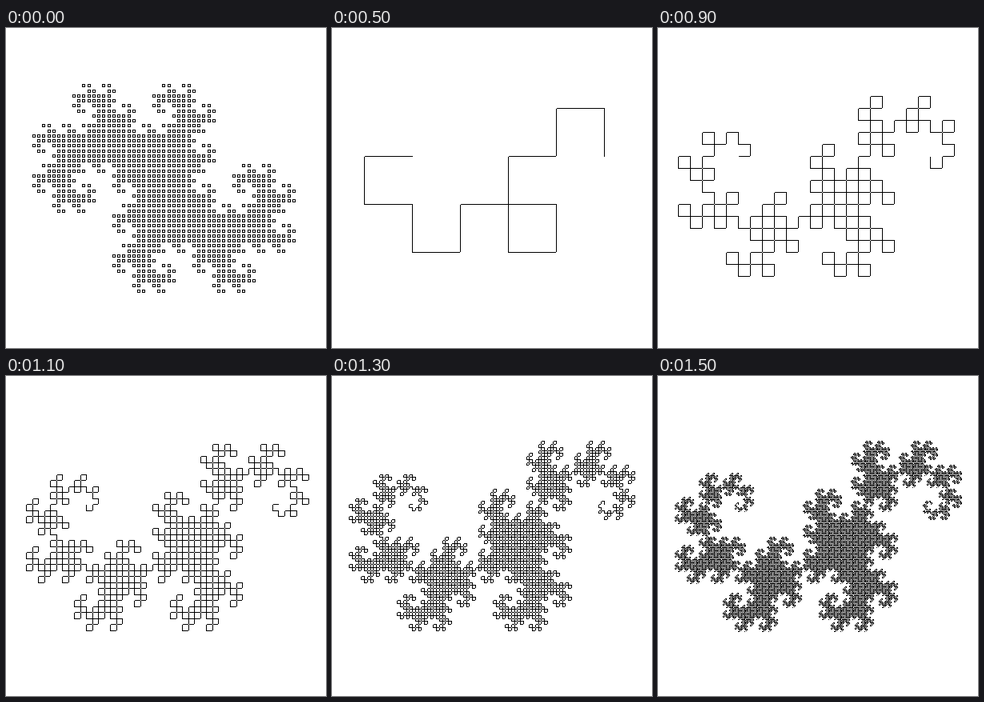
Write an HTML page with a canvas that moves like this. It is 400 by 400 pixels and loops after 1600 ms.

```html
<!DOCTYPE html>
<html lang="en">
<head>
<meta charset="utf-8">
<title>Dragon curves</title>
<style>
  html, body { margin: 0; width: 100%; height: 100%; overflow: hidden; background: #fff; }
  canvas { display: block; }
</style>
</head>
<body>
<canvas id="stage" width="400" height="400"></canvas>
<script>
const STEP = 100, STEPS = 16;
const ctx = document.getElementById('stage').getContext('2d');
const plot = (x, y) => ctx.fillRect(x, y, 1, 1);

// All sums of distinct powers of 1+i, each shown as a small box.
function drawTwindragon(digits) {
  let cells = [[0, 0]], re = 1, im = 0;
  for (let k = 0; k < digits; k++) {
    cells = cells.concat(cells.map(([x, y]) => [x + re, y + im]));
    [re, im] = [re - im, re + im];
  }
  const pitch = 6.25;
  for (const [x, y] of cells) {
    ctx.strokeRect(Math.round(95.3125 + x * pitch) + 0.5,
                   Math.round(195.3125 + y * pitch) + 0.5, 3, 3);
  }
}

// Replace every segment by two, bending alternately right and left.
function fold(points) {
  const out = [points[0]];
  for (let i = 1; i < points.length; i++) {
    const [x0, y0] = points[i - 1], [x1, y1] = points[i];
    const side = i % 2 ? 1 : -1;
    out.push([(x0 + x1 - side * (y1 - y0)) / 2, (y0 + y1 + side * (x1 - x0)) / 2], points[i]);
  }
  return out;
}

function drawSegment([x0, y0], [x1, y1]) {
  const n = Math.max(Math.abs(x1 - x0), Math.abs(y1 - y0));
  for (let k = 1; k < n; k++) {
    plot(Math.round(x0 + (x1 - x0) * k / n), Math.round(y0 + (y1 - y0) * k / n));
  }
}

function drawDragon(order) {
  let points = [[100, 160], [340, 160]];
  for (let k = 0; k < order; k++) points = fold(points);
  points = points.map(p => p.map(Math.round));

  const diagonal = order % 2 === 1;
  points.forEach((p, i) => {
    const next = points[i + 1], prev = points[i - 1];
    if (next) drawSegment(p, next);
    // Upright corners lose their pixel at the top left and bottom right.
    const leads = [prev, next].filter(Boolean).map(q => q[0] + q[1] < p[0] + p[1]);
    if (diagonal || leads.filter(Boolean).length === 1) plot(...p);
  });
}

let shown = -1;
function render() {
  const step = Math.floor(performance.now() / STEP) % STEPS;
  if (step !== shown) {
    shown = step;
    ctx.fillStyle = '#fff';
    ctx.fillRect(0, 0, 400, 400);
    ctx.fillStyle = ctx.strokeStyle = '#000';
    if (step === 0) drawTwindragon(10);
    else drawDragon(step - 1);
  }
  requestAnimationFrame(render);
}
render();
</script>
</body>
</html>
```
